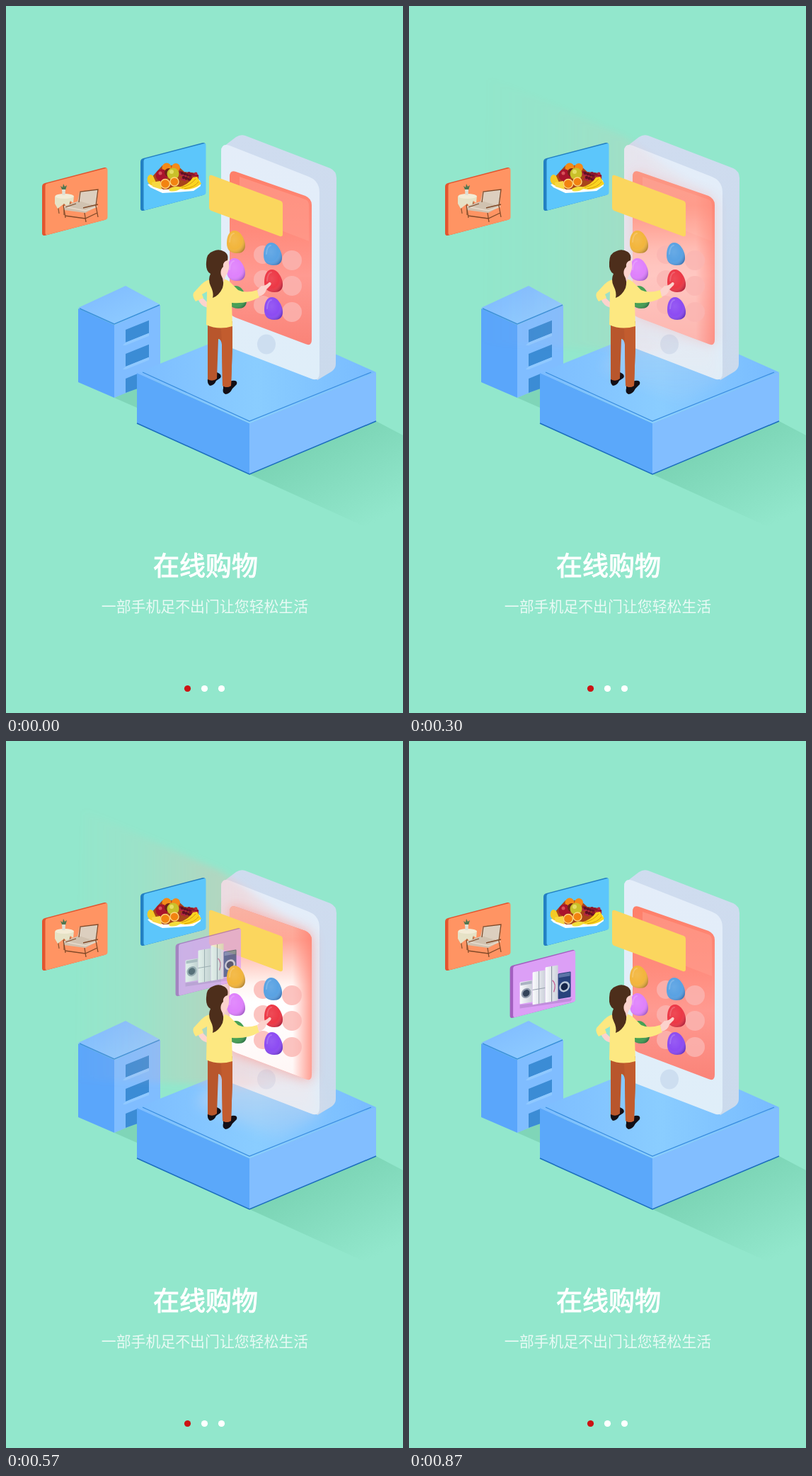
An HTML page for the animation above (900 ms loop, 561x998 px).

```html
<!DOCTYPE html>
<html lang="zh-CN">
<head>
<meta charset="utf-8">
<title>在线购物</title>
<style>
html, body { margin: 0; width: 100%; height: 100%; overflow: hidden; background: #92e7cc; }
svg { display: block; width: 100%; height: 100%; }
text { font-family: "Noto Sans CJK SC", "Noto Sans CJK", "Noto Sans", sans-serif; fill: #fff; text-anchor: middle; }
</style>
</head>
<body>
<svg viewBox="0 0 561 998" preserveAspectRatio="none">
<defs>
  <linearGradient id="shade" gradientUnits="userSpaceOnUse" x1="440" y1="610" x2="505" y2="737">
    <stop offset="0" stop-color="#7bd4b5"/><stop offset="1" stop-color="#92e7cc"/>
  </linearGradient>
  <linearGradient id="deck" x1="0" x2="1">
    <stop offset="0" stop-color="#7dbdff"/><stop offset=".5" stop-color="#8acdff"/><stop offset="1" stop-color="#78bbff"/>
  </linearGradient>
  <linearGradient id="lid" x1="0" x2="1" y2="1">
    <stop offset="0" stop-color="#7db9ff"/><stop offset="1" stop-color="#92cfff"/>
  </linearGradient>
  <linearGradient id="side" x1="0" y1="0" x2="0" y2="1">
    <stop offset="0" stop-color="#cfdcef"/><stop offset="1" stop-color="#cbdaec"/>
  </linearGradient>
  <linearGradient id="front" x1="0" y1="0" x2="0" y2="1">
    <stop offset="0" stop-color="#e4edf9"/><stop offset="1" stop-color="#dfeef9"/>
  </linearGradient>
  <linearGradient id="screen" x1="0" y1="0" x2="0" y2="1">
    <stop offset="0" stop-color="#fe7f69"/><stop offset=".35" stop-color="#ff8b7c"/>
    <stop offset=".6" stop-color="#ff9a91"/><stop offset="1" stop-color="#fa8378"/>
  </linearGradient>
  <linearGradient id="lit" gradientUnits="userSpaceOnUse" x1="0" y1="232" x2="0" y2="480">
    <stop offset="0" stop-color="#f8b3a4"/><stop offset=".2" stop-color="#ffa797"/>
    <stop offset=".45" stop-color="#fff4f1"/><stop offset=".55" stop-color="#fff"/><stop offset="1" stop-color="#fff6f5"/>
  </linearGradient>
  <linearGradient id="rim" gradientUnits="userSpaceOnUse" x1="405" y1="0" x2="432" y2="0">
    <stop offset="0" stop-color="#ff8070" stop-opacity="0"/><stop offset="1" stop-color="#ff8070" stop-opacity=".75"/>
  </linearGradient>
  <linearGradient id="beam" gradientUnits="userSpaceOnUse" x1="90" y1="0" x2="430" y2="0">
    <stop offset="0" stop-color="#ffb0a4" stop-opacity="0"/><stop offset=".3" stop-color="#ffb0a4" stop-opacity=".09"/>
    <stop offset=".6" stop-color="#ffada4" stop-opacity=".28"/><stop offset=".72" stop-color="#ffb8b0" stop-opacity=".32"/>
    <stop offset="1" stop-color="#ffd0ca" stop-opacity=".08"/>
  </linearGradient>
  <linearGradient id="floor" gradientUnits="userSpaceOnUse" x1="0" y1="475" x2="0" y2="570">
    <stop offset="0" stop-color="#ffe1e0" stop-opacity=".4"/><stop offset="1" stop-color="#ffe1e0" stop-opacity=".05"/>
  </linearGradient>
  <radialGradient id="gloss" cx=".4" cy=".4" r=".68">
    <stop offset="0" stop-color="#fff" stop-opacity=".12"/><stop offset=".6" stop-color="#fff" stop-opacity=".03"/>
    <stop offset="1" stop-color="#003" stop-opacity=".25"/>
  </radialGradient>
  <linearGradient id="metal" x1="0" x2="1">
    <stop offset="0" stop-color="#fafbfd"/><stop offset="1" stop-color="#ccd1da"/>
  </linearGradient>
  <filter id="soft" x="-50%" y="-50%" width="200%" height="200%"><feGaussianBlur stdDeviation="9"/></filter>
  <filter id="haze" x="-20%" y="-20%" width="140%" height="140%"><feGaussianBlur stdDeviation="5"/></filter>
  <path id="glass" d="M316 241Q316 231 325 234L423 268Q432 272 432 281V471Q432 481 423 477L325 440Q316 437 316 428Z"/>
  <path id="egg" d="M-13 2C-13-9-9-16-2-16C6-16 13-4 13 5C13 13 8 16 1 16C-8 16-13 11-13 2Z"/>
</defs>

<rect width="561" height="998" fill="#92e7cc"/>
<path d="M344 661L523 586L561 606V752L518 740Z" fill="url(#shade)"/>
<path d="M153 553L219 522V560L185 567Z" fill="#7fd5b8"/>

<!-- cabinet -->
<path d="M102 427L153 450V553L102 531Z" fill="#5aa6fb"/>
<path d="M153 450L218 422V526L153 553Z" fill="#80bdff"/>
<path d="M102 426L169 395L217 421L153 449Z" fill="url(#lid)"/>
<path d="M104 427L153 449L217 422" fill="none" stroke="#3a8ede" stroke-width="1.4"/>
<g id="shelves"></g>

<!-- platform -->
<path d="M185 518L344 589V661L185 589Z" fill="#5ba8fa"/>
<path d="M344 589L523 517V586L344 661Z" fill="#82beff"/>
<path d="M185 518L364 446L523 517L344 589Z" fill="url(#deck)"/>
<path d="M193 517L344 586L516 517" fill="none" stroke="#3a8ede" stroke-width="1.3"/>
<path d="M185 589L344 661L523 586" fill="none" stroke="#1d6fbe" stroke-width="1.6"/>

<!-- phone -->
<path d="M304 201L325 185Q331 181 338 183L458 229Q467 233 467 243L466 505Q466 512 460 516L440 528L320 400Z" fill="url(#side)"/>
<path d="M304 206Q304 193 316 197L428 241Q443 247 443 263V517Q443 531 431 526L314 481Q304 477 304 466Z" fill="url(#front)"/>
<ellipse cx="368" cy="477.500" rx="13" ry="14" fill="#cddef0"/>
<use href="#glass" fill="url(#screen)"/>
<path d="M330 241L423 273Q428 275 428 281V332L330 294Z" fill="#ff9c8c" opacity=".65"/>
<g id="glow" opacity="0">
  <path d="M110 98L304 184L432 272V478L330 490L290 484L100 478Z" fill="url(#beam)" filter="url(#haze)"/>
  <path d="M300 478H432L443 528L385 562L268 512Z" fill="url(#floor)" filter="url(#soft)"/>
  <use href="#glass" fill="#ff8d82" filter="url(#soft)" opacity=".7"/>
  <use href="#glass" fill="url(#lit)"/>
  <use href="#glass" fill="url(#rim)"/>
</g>
<g fill="#fbb6b2" opacity=".8">
  <circle cx="404" cy="359" r="14"/><circle cx="404" cy="395" r="14"/><circle cx="404" cy="432" r="14"/>
  <circle cx="363" cy="351" r="13"/><circle cx="363" cy="386" r="13"/><circle cx="363" cy="422" r="13"/>
</g>
<path d="M287 242Q287 238 291 239L388 275Q391 276 391 280V322Q391 326 387 325L290 289Q287 288 287 284Z" fill="#fbd65e"/>

<!-- furniture card -->
<g id="sofa" transform="translate(51 251)">
  <path d="M21 22L24 42M39 22L41 38M31 24V44" stroke="#8a5733" stroke-width="1.3" fill="none"/>
  <path d="M18 18Q32 12 45 17L44 27L40 24L37 33L31 28L22 35L18 28Z" fill="#e6e2c6"/>
  <ellipse cx="31.500" cy="17.500" rx="13" ry="3.500" fill="#f3ecd6"/>
  <path d="M28 8L26 3L29 5L30 0L32 4L35 2L33 9Z" fill="#4f7750"/>
  <path d="M28 8H33L32.500 16H28.500Z" fill="#dfe0d5"/>
  <path d="M53 11L79 8L77 31L50 26Z" fill="#dccfbf"/>
  <path d="M30 32L52 24L78 32L61 41L31 37Z" fill="#d0c2b0"/>
  <path d="M30 32L61 38L78 32" fill="none" stroke="#e7dccd" stroke-width="1.500"/>
  <path d="M30 30L33 48M33 33L48 28M60 41L62 54M52 26L54 11L79 8L76 31L79 47M58 34L79 29M32 45L61 49L78 41" fill="none" stroke="#804a29" stroke-width="1.300"/>
</g>

<!-- fruit card -->
<g id="fruit" transform="translate(190 216)">
  <path d="M10 36L30 30L84 30L85 38L75 45L50 47L31 48L14 40Z" fill="#fff"/>
  <path d="M12 30L31 9L52 9L62 18L80 20L83 36L60 42L32 43Z" fill="#a8451a"/>
  <g fill="#f38a19"><circle cx="37" cy="12" r="6.500"/><circle cx="50" cy="12" r="6"/></g>
  <path d="M10 26Q13 19 18 24L22 33Q21 39 15 37Q8 33 10 26Z" fill="#f3cb26"/>
  <circle cx="30" cy="23" r="8.500" fill="#a9142c"/><circle cx="40" cy="19" r="6" fill="#6f2317"/>
  <circle cx="46" cy="21" r="8.500" fill="#c9c02a"/><circle cx="44" cy="18" r="3" fill="#e6dd62"/>
  <circle cx="28" cy="20" r="2.500" fill="#d8505a"/>
  <g id="grapes"></g>
  <path d="M54 40Q68 36 74 26L80 25L86 35Q72 46 56 42Z" fill="#fbd51f"/>
  <path d="M58 40Q71 37 78 28M62 42Q77 40 82 32" fill="none" stroke="#d59a10"/>
  <path d="M16 33L28 31L30 43L17 39Z" fill="#f7d844"/>
  <g fill="#f28311" stroke="#ffd47a" stroke-width="1.400">
    <circle cx="35" cy="35" r="6.500"/><circle cx="48" cy="32" r="6"/>
  </g>
  <path d="M40 42Q52 36 58 41Q50 47 41 45Z" fill="#f3dd3c"/>
</g>

<!-- appliance card -->
<g id="goods" opacity="0">
  <g transform="matrix(1 -.17 0 1 0 0)">
    <path d="M14 57L88 60L86 64L14 62Z" fill="#8063a0" opacity=".3"/>
    <rect x="14" y="25" width="18" height="31" rx="1" fill="url(#metal)"/>
    <rect x="15" y="26" width="16" height="4" fill="#aab3c2"/>
    <circle cx="23" cy="42" r="7" fill="#8f9aab"/><circle cx="23" cy="42" r="4.800" fill="#34435a"/>
    <rect x="32" y="14" width="18" height="46" rx="1" fill="url(#metal)"/>
    <path d="M41 14V60M32 39H50" stroke="#8f98a6" stroke-width=".9"/>
    <rect x="50" y="10" width="18" height="50" rx="1" fill="url(#metal)"/>
    <path d="M59 10V60" stroke="#7d8797"/>
    <path d="M60 30Q66 36 62 47" fill="none" stroke="#c65c92" stroke-width="1.300"/>
    <rect x="68" y="22" width="18" height="36" rx="1" fill="#27427c"/>
    <rect x="69" y="23" width="16" height="5" fill="#5b74a6"/>
    <circle cx="77" cy="42" r="7.500" fill="#b9c6d8"/><circle cx="77" cy="42" r="5" fill="#16264a"/>
  </g>
</g>

<g id="eggs"></g>

<!-- shopper -->
<path d="M285 519L298 517Q306 520 303 525L297 529Q294 536 288 536Q284 533 285 526Z" fill="#130f16"/>
<path d="M307 535L319 529Q328 528 326 534L320 540Q316 548 310 548Q305 545 307 540Z" fill="#130f16"/>
<path d="M285 445H320V480L318 536Q312 540 306 536L305 478Q304 470 300 470L298 526Q292 531 285 527Z" fill="#b8562c"/>
<path d="M304 455L320 450V480L318 536Q312 540 306 536L305 478Z" fill="#c25c2e"/>
<path d="M271 413Q275 424 285 426L284 418L278 412Z" fill="#fcd3cd"/>
<path d="M289 386Q282 387 276 393L265 405Q263 410 268 417L279 412L277 407L284 403L283 450Q300 458 320 452L319 419Q341 421 358 411L355 401Q339 406 328 401L316 389Q303 381 289 386Z" fill="#fde881"/>
<path d="M355 401L361 395Q366 396 372 390Q376 390 374 394L368 400Q366 408 357 410Z" fill="#fcd3cd"/>
<path d="M301 358L314 357Q317 368 313 377Q309 382 308 389L299 388Z" fill="#fcd3cd"/>
<path d="M283 362Q283 349 293 346Q301 342 309 347Q315 351 313 359Q306 361 307 368Q302 373 304 380Q309 388 306 398Q301 409 292 412Q294 405 289 395Q285 386 289 378Q282 374 283 362Z" fill="#4d2e1b"/>

<text x="282" y="804" font-size="37" font-weight="500" stroke="#fff" stroke-width="1.1">在线购物</text>
<text x="281" y="855" font-size="20.900" font-weight="300" opacity=".8">一部手机足不出门让您轻松生活</text>
<circle cx="256.500" cy="963.500" r="4.600" fill="#cc1414"/>
<circle cx="280.500" cy="963.500" r="4.600" fill="#fff"/>
<circle cx="304.500" cy="963.500" r="4.600" fill="#fff"/>
</svg>
<script>
const LOOP = 900, STEP = 30;
const el = id => document.getElementById(id);
const ramp = (t, a, b) => Math.min(1, Math.max(0, (t - a) / (b - a)));
const add = (id, html, where = 'beforeend') => el(id).insertAdjacentHTML(where, html);

function addPanel(id, edge, face) {
  add(id, `<g transform="matrix(1 -.26 0 1 0 0)">
      <rect width="92" height="74" rx="4" fill="${edge}"/>
      <rect x="4.500" y="1.500" width="88" height="72.500" rx="3" fill="${face}"/>
    </g>`, 'afterbegin');
}

function addEgg(x, y, color) {
  add('eggs', `<g transform="translate(${x} ${y})">
      <use href="#egg" fill="${color}"/><use href="#egg" fill="url(#gloss)"/>
      <path d="M-9 0C-9-7-6-12-3-12" fill="none" stroke="#fff" stroke-width="2" stroke-linecap="round" opacity=".18"/>
    </g>`);
}

function addShelf(y, w, h) {
  const k = -.4 * w;
  add('shelves', `<path d="M169 ${y}l${w} ${k}v${h}l${-w} ${-k}z" fill="#3b8cd5"/>
    <path d="M165 ${y + h + 4}l4-4l${w} ${k}v4l${-w} ${-k}z" fill="#90c9ff"/>`);
}

addPanel('sofa', '#e2552f', '#ff9463');
addPanel('fruit', '#2380c2', '#5cc6fb');
addPanel('goods', '#a35fc0', '#dc9ff6');

addShelf(457, 33, 18);
addShelf(491, 33, 18);
add('shelves', '<path d="M169 526L186 519V540L169 546Z" fill="#3b8cd5"/>');

addEgg(325, 333, '#f2b336');
addEgg(325, 372, '#de7dfc');
addEgg(327, 411, '#3f9c4d');
addEgg(377, 350, '#549fe2');
addEgg(378, 388, '#ec3240');
addEgg(378, 427, '#8946f2');

for (let i = 0; i < 24; i++) {
  const x = 57 + (i * 7.7) % 25, y = 19 + (i * 5.3) % 11;
  add('grapes', `<circle cx="${x}" cy="${y}" r="2.2" fill="${['#8b1530', '#b3263e', '#611024'][i % 3]}"/>`);
}

function draw(t) {
  const light = ramp(t, 240, 375) * (1 - ramp(t, 570, 700));
  el('glow').setAttribute('opacity', light);
  const u = t - 390;
  const x = 301.6 - .3529 * u + .0000452 * u * u;
  const y = 305 - .1757 * u + .000422 * u * u;
  el('goods').setAttribute('transform', `translate(${x} ${y})`);
  el('goods').setAttribute('opacity', ramp(t, 300, 690));
}

function tick(now) {
  draw(Math.floor(now % LOOP / STEP) * STEP);
  requestAnimationFrame(tick);
}
draw(0);
requestAnimationFrame(tick);
</script>
</body>
</html>
```
